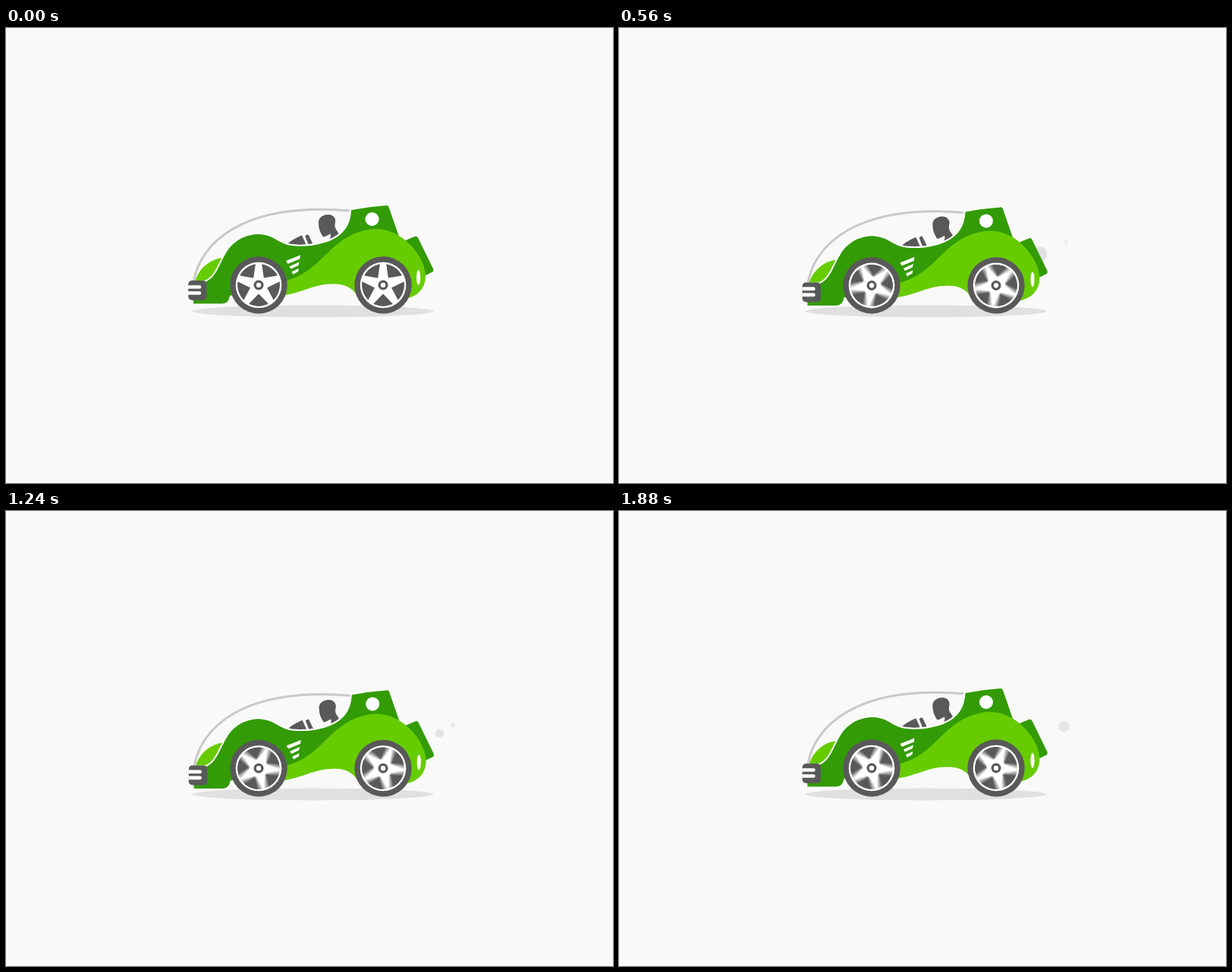
An HTML page for the animation above (1920 ms loop, 800x600 px).

```html
<!DOCTYPE html>
<html lang="en">
<head>
<meta charset="utf-8">
<title>Green car</title>
<style>
  html, body { margin: 0; width: 100%; height: 100%; overflow: hidden; background: #f9f9f9; }
  svg { display: block; width: 800px; height: 600px; }
</style>
</head>
<body>
<svg viewBox="0 0 800 600">
  <defs>
    <g id="spokes">
      <circle r="27.7" fill="#595959"/>
      <path id="star" fill="#fff"/>
    </g>
    <path id="shell" d="M247 363.500V335H262C277 330 281 311 291 295C302 278 319 271.500 335 272C351 273 357 281 368 285C378 288.500 395 288.500 410 285.500C438 280 454 266 455 240Q478 235.500 501 234Q503.500 233.500 504.500 236L518 275L500 300L372 340L295 353Q293.500 363.500 285 363.500Z"/>
  </defs>
  <ellipse cx="404.5" cy="373.5" rx="159" ry="8" fill="#e0e0e0"/>
  <g id="smoke" fill="#dfdfdf"></g>

  <g id="car">
    <path d="M247.500 334C256 285 309 229 454 241" fill="none" stroke="#c9c9c9" stroke-width="3"/>

    <g fill="#595959">
      <path id="head" d="M412 258C411 250 418 246 425 246C431 246 435 251 434 256C433 261 433 263 436 267L439.500 273L425 284C427 278 429 274 427.500 271.500C424 273 421 275 418 275.500C414 270 412 264 412 258Z"/>
      <path d="M370 285.500C376 280 384 275.500 390 273.500L397 289L370 290Z"/>
      <path d="M394.500 275C394 272.500 398 271.500 399 273.500L404.500 285L400 289Z"/>
    </g>

    <!-- rear bumper and front fender -->
    <path d="M522 282L538.500 275Q541.500 273.800 543 276.500L563 317.500Q564 320.500 561.500 322L549 328Z" fill="#339b06"/>
    <path d="M248.500 336C253 319 266 306 285 303L284 336Z" fill="#6c0"/>

    <!-- dark shell with a white seam around it -->
    <use href="#shell" fill="none" stroke="#fff" stroke-width="4" clip-path="inset(0 0 29px 0)"/>
    <use href="#shell" fill="#339b06"/>

    <!-- light shell -->
    <path d="M355 336C402 330 416 299 442 281C461 267.500 478 265 488 265C504 265 520 273 532 285C546 299 553 315 553 329C552 344 542 353.500 529 356.500L480 362L463 353C456 342.500 447 337 430 337.500C404 338 393 348.500 366 352.500Z" fill="#6c0"/>
    <ellipse cx="543.600" cy="329" rx="2.600" ry="10" fill="#fff"/>

    <g fill="#fff">
      <path d="M369 307L388 299.500L387.300 304.500L371.500 311Z"/>
      <path d="M373.500 314.500L386.500 308.500L385.500 313L375.500 317.800Z"/>
      <path d="M376.500 321.500L385.800 317L385.300 321L378.500 325Z"/>
      <circle cx="482.500" cy="252" r="9"/>
    </g>

    <rect x="240.200" y="333" width="24.300" height="26" rx="5" fill="#595959"/>
    <path d="M240 339.200H255a2.300 2.300 0 0 1 0 4.600H240ZM240 347.200H255a2.300 2.300 0 0 1 0 4.600H240Z" fill="#fff"/>
  </g>
  <g id="wheels"></g>
</svg>
<script>
const LOOP = 1920, STEP = 40, TURNS = 3, COPIES = 9, BLUR = 16;
const RADIUS = 37.7, GROUND = 376.7;
const $ = id => document.getElementById(id);

function add(parent, tag, attrs) {
  const el = document.createElementNS("http://www.w3.org/2000/svg", tag);
  for (const k in attrs) el.setAttribute(k, attrs[k]);
  parent.appendChild(el);
  return el;
}

const clamp = v => Math.min(1, Math.max(0, v));
const smooth = p => p * p * (3 - 2 * p);
const ramp = (t, from, to) => smooth(clamp((t - from) / (to - from)));
// Soft bump that peaks at mid and vanishes half away from it.
const pulse = (t, mid, half) => Math.cos(clamp(Math.abs(t - mid) / half) * Math.PI / 2) ** 2;

const sway = t => 1.4 - 2.4 * pulse(t, 150, 340) - 2.1 * pulse(t, 1400, 270);
const bounce = t => 2.4 * ramp(t, 0, 160) * (1 - ramp(t, 1420, 1680))
  - 1.2 * pulse(t, 830, 220) - 2.8 * pulse(t, 1570, 110);
const nod = t => 1.8 * (pulse(t, 200, 200) + pulse(t, 1400, 270));
const squash = t => 2 * (pulse(t, 480, 160) + pulse(t, 1400, 240));

function puffAt(age) {
  const p = clamp(age / 420), q = clamp(age / 550);
  return {
    cx: 541.5 + 47.5 * (1 - (1 - p) ** 2),
    cy: 299 - 17 * smooth(p),
    r: 13 * (1 - q ** 1.5) * clamp(age / 75),
    opacity: 1 - age / 1200
  };
}

// start time and size of each puff
const puffs = [[80, 1], [500, 1], [690, 0.5], [780, 1], [1075, 0.5], [1270, 1], [1560, 1]]
  .map(([start, size]) => ({ start, size, el: add($("smoke"), "circle", {}) }));

function starPath() {
  const pts = [];
  for (let i = 0; i < 5; i++) {
    const a = i * Math.PI * 2 / 5, c = Math.cos(a), s = Math.sin(a);
    for (const [x, y] of [[-4, -29], [4, -29], [6.8, -9.4]])
      pts.push((x * c - y * s).toFixed(2) + " " + (x * s + y * c).toFixed(2));
  }
  return "M" + pts.join("L") + "Z";
}
$("star").setAttribute("d", starPath());

const wheels = [333, 497].map(x => {
  const g = add($("wheels"), "g", {});
  const circle = (r, fill) => add(g, "circle", { r, fill });
  circle(RADIUS, "#595959");
  circle(30.3, "#fff");
  // Falling opacities give every copy the same weight.
  const copies = Array.from({ length: COPIES }, (_, i) =>
    add(g, "use", { href: "#spokes", opacity: 1 / (i + 1) }));
  circle(9, "#fff");
  circle(6.5, "#595959");
  circle(3.2, "#fff");
  return { x, g, copies };
});

function draw(t) {
  $("car").setAttribute("transform", `translate(${sway(t)} ${bounce(t)})`);
  $("head").setAttribute("transform", `translate(0 ${nod(t)})`);

  const scale = 1 - squash(t) / (2 * RADIUS);
  const turn = -360 * TURNS * t / LOOP, spread = t ? BLUR : 0;
  for (const { x, g, copies } of wheels) {
    g.setAttribute("transform", `translate(${x} ${GROUND - RADIUS * scale}) scale(1 ${scale})`);
    copies.forEach((el, i) =>
      el.setAttribute("transform", `rotate(${turn + spread * (i / (COPIES - 1) - 0.5)})`));
  }

  for (const { start, size, el } of puffs) {
    const puff = puffAt(t - start);
    puff.r *= size;
    for (const k in puff) el.setAttribute(k, puff[k]);
  }
}

const begin = performance.now();
function tick() {
  const t = Math.max(0, performance.now() - begin) % LOOP;
  draw(Math.floor(t / STEP) * STEP);
  requestAnimationFrame(tick);
}
draw(0);
requestAnimationFrame(tick);
</script>
</body>
</html>
```
